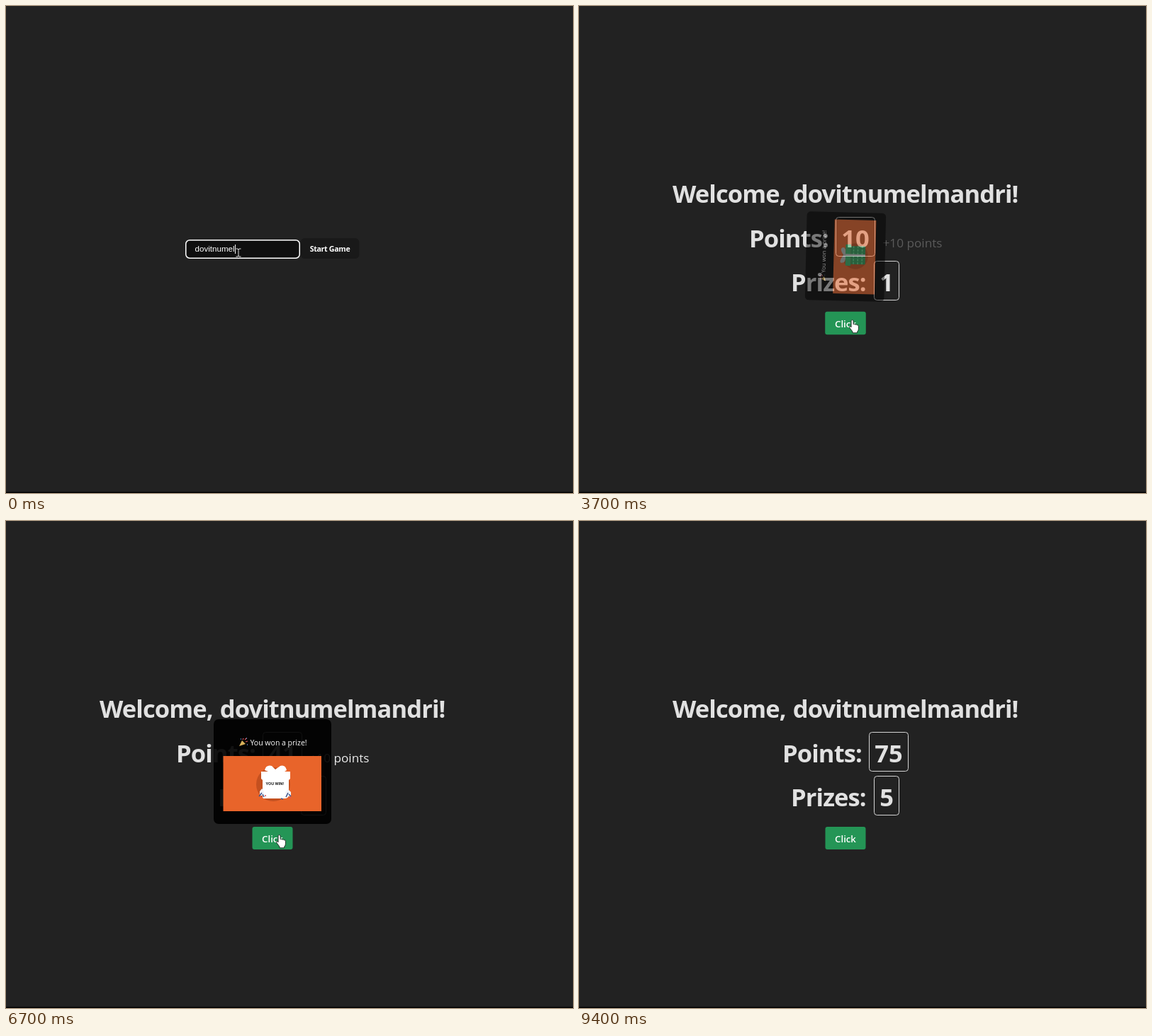
An HTML page that plays this animation: 800 px wide and 688 px high, repeating every 9.6 s.

```html
<!DOCTYPE html>
<html lang="en">
<head>
<meta charset="utf-8">
<title>Click game</title>
<style>
  html, body { margin: 0; width: 100%; height: 100%; overflow: hidden; background: #222; }
  svg { display: block; width: 800px; height: 688px; }
  text { font-family: "Open Sans", "Noto Sans", sans-serif; fill: #fff; white-space: pre; }
  .heading { font-size: 34.5px; font-weight: 700; letter-spacing: -.9px; word-spacing: 2px; fill: #e1e1e1; }
  .number { font-size: 34.5px; font-weight: 700; fill: #e1e1e1; text-anchor: middle; }
  .frame { fill: none; stroke: #d4d4d4; }
  .field { font: 11.6px "Liberation Sans", Arial, sans-serif; }
  .start { font-size: 10.6px; font-weight: 700; letter-spacing: -.3px; text-anchor: middle; }
  .click { font-size: 13.2px; font-weight: 600; text-anchor: middle; }
  .bonus { font-size: 17.2px; fill: #ebebeb; }
  .title { font-size: 10.5px; }
  .win { font: 700 5.9px Roboto, sans-serif; fill: #222; text-anchor: middle; }
</style>
</head>
<body>
<svg viewBox="0 0 800 688">
  <defs>
    <!-- card, centred on its own origin -->
    <g id="cardBase">
      <rect x="-83" y="-74" width="166" height="148" rx="7" fill="#000" fill-opacity=".92"/>
      <path d="M-47 -36l4 -8 5 5z" fill="#d8b15a"/>
      <path d="M-42 -45l1 -2M-38 -42l3 -1M-39 -45l2 -2" stroke="#d9575c" stroke-width="1.3"/>
      <path d="M-45 -46h1M-36 -38h1M-37 -47h1" stroke="#6f9be0" stroke-width="1.3"/>
      <text class="title" x="-31.5" y="-37">You won a prize!</text>
      <rect x="-69.5" y="-22" width="138.5" height="78" fill="#e8642a"/>
      <circle cx="1" cy="18" r="24" fill="#c4501f"/>
    </g>
    <g id="closedGift">
      <path d="M3 -4q-18 -12 -14 1q3 4 14 3q14 1 14 -4q-1 -9 -14 0z" fill="#b9bdb8"/>
      <rect x="-17" y="0" width="40" height="10" rx="1" fill="#39b56a"/>
      <rect x="-14" y="10" width="34" height="27" rx="1" fill="#2f9d59"/>
      <path d="M-14 15h34M-14 23h34M-14 31h34" stroke="#69d68c" stroke-width="2" stroke-dasharray="4 2"/>
      <path d="M3 0v37" stroke="#c9cdc8" stroke-width="4"/>
    </g>
    <g id="openGift">
      <path d="M4 -3l-5 -5q-8 -2 -10 6l5 2h-10v10l2 2v24q0 2 3 2h28q5 0 6 -4V12l2 -2V0h-8l3 -2q-2 -8 -9 -6z" fill="#fff"/>
      <text class="win" x="3.3" y="19">YOU WIN!</text>
      <path d="M-18 28l3 -4 3 4v6h-6zM18 29l4 -4 4 4v6h-7z" fill="#f3f4f8"/>
      <path d="M-19 35l4 -5M-12 36l-2 -4M19 36l3 -6M26 35l-3 -3M12 38l3 1" stroke="#40568c" stroke-width="1.6"/>
      <path d="M-17 36h2M-11 34h2M23 37h3" stroke="#d9575c" stroke-width="1.4"/>
    </g>
  </defs>

  <rect width="800" height="688" fill="#222"/>
  <rect y="686.5" width="800" height="1.5" fill="#000"/>

  <g id="login">
    <rect id="field" x="253.75" y="330.75" width="160.5" height="25.5" rx="5.5" fill="#0f0f0f" stroke-width="1.5"/>
    <text id="typed" class="field" x="266.5" y="347"></text>
    <rect id="caret" y="337" width="1" height="13" fill="#fff"/>
    <rect id="start" x="415.5" y="328" width="83" height="29" rx="6" fill="#191919"/>
    <text class="start" x="457" y="347">Start Game</text>
  </g>

  <g id="game">
    <text id="welcome" class="heading" x="132" y="278"></text>
    <g id="pointsRow">
      <text class="heading" x="2" y="341">Points:</text>
      <rect id="pointsBox" class="frame" x="124.5" y="298.5" height="55" rx="4"/>
      <text id="points" class="number" y="341"></text>
      <text id="bonus" class="bonus" x="190.5" y="340.5">+10 points</text>
    </g>
    <text class="heading" x="299" y="403">Prizes:</text>
    <rect class="frame" x="416.5" y="360.5" width="35" height="55" rx="4"/>
    <text id="prizes" class="number" x="434" y="403"></text>
    <g id="button">
      <rect id="buttonFace" x="-28.5" y="-16" width="57" height="32" rx="3"/>
      <text class="click" x="0" y="5.5">Click</text>
    </g>
    <g id="cards"></g>
  </g>

  <g id="cursor">
    <path id="beam" d="M-3.5 -5.5h2.5l1 1 1 -1h2.5M0 -4.5v9M-3.5 5.5h2.5l1 -1 1 1h2.5" fill="none" stroke="#ddd"/>
    <path id="arrow" d="M0 0v11.5l2.7 -2.4 2 4.4 2 -.9 -2 -4.3h3.6z" fill="#fff" stroke="#111" stroke-width=".7"/>
    <path id="hand" d="M-1.4 1q1.5 -2 3 0v5.2q1.5 -1.2 2.6 .4 1.6 -.9 2.5 .6 2 -.5 2.2 1.4v4q0 2.6 -1.8 4v1.7h-6.6v-1.7l-4.3 -5.8q-.4 -2 1.5 -1.6l.9 1z" fill="#fff" stroke="#111" stroke-width=".8"/>
  </g>
</svg>
<script>
const LOOP = 9600, STEP = 100, GAME_START = 2100, LIFE = 700;
const NAME = "dovitnumelmandri";

// Each award: time, points after it, and optionally a bonus note and a prize card's height
const awards = [
  { at: 3600, points: 10, bonus: true, cardY: 354 },
  { at: 5000, points: 20, bonus: true },
  { at: 5600, points: 30, bonus: true },
  { at: 6400, points: 31 },
  { at: 6470, points: 41, bonus: true, cardY: 354 },
  { at: 7200, points: 42 },
  { at: 7500, points: 43 },
  { at: 7870, points: 53, bonus: true, cardY: 354 },
  { at: 8430, points: 63, bonus: true, cardY: 354 },
  { at: 8490, points: 73, bonus: true, cardY: 166 },
  { at: 8700, points: 74 },
  { at: 8900, points: 75 },
];
const presses = [3500, 3900, 4200, 4500, 4900, 5200, 5500, 5900, 6300,
                 6900, 7100, 7400, 7700, 8000, 8300, 8600, 8800];
const cursorPath = [
  [1000, 328, 348.5], [1900, 458, 347], [2000, 457, 347], [2200, 451, 349.5],
  [2300, 452, 349], [2500, 452, 348], [3400, 385.5, 443.5],
];

const $ = id => document.getElementById(id);
const set = (node, attrs) => { for (const k in attrs) node.setAttribute(k, attrs[k]); };
const show = (node, on) => { node.style.display = on ? "" : "none"; };
const clamp = x => Math.max(0, Math.min(1, x));
const smooth = x => (x = clamp(x), x * x * (3 - 2 * x));

$("welcome").textContent = `Welcome, ${NAME}!`;
const cards = awards.filter(a => a.cardY).map(award => {
  const node = document.createElementNS("http://www.w3.org/2000/svg", "g");
  node.innerHTML = '<use href="#cardBase"/><use href="#closedGift"/><use href="#openGift"/>';
  $("cards").append(node);
  return { award, node };
});

function drawLogin(t) {
  const focused = t < 2000;
  $("typed").textContent = NAME.slice(0, 10 + Math.floor(t / 190));
  $("caret").setAttribute("x", 267 + $("typed").getComputedTextLength());
  show($("caret"), focused);
  $("field").setAttribute("stroke", focused ? "#fff" : "none");
  $("start").setAttribute("stroke", t >= 1700 ? "#646cff" : "none");
}

function drawCard({ award, node }, t) {
  const age = t - award.at;
  const visible = age >= 0 && age < LIFE;
  show(node, visible);
  if (!visible) return;
  const enter = smooth(age / 198), leave = clamp((LIFE - age) / 150);
  const scale = .5 + .5 * Math.min(enter, leave);
  set(node, {
    transform: `translate(376 ${award.cardY}) rotate(${-180 * (1 - enter)}) scale(${scale})`,
    opacity: enter * leave,
  });
  show(node.children[1], age < 150);
  show(node.children[2], age >= 150);
}

function drawGame(t) {
  const done = awards.filter(a => a.at <= t);
  const notes = done.filter(a => a.bonus && t - a.at < LIFE);
  const points = String(done.length ? done[done.length - 1].points : 0);
  const width = 15 + 20 * points.length;
  const left = 285 + (points.length === 1 ? 10 : 0) - (notes.length ? 47 : 0);

  set($("pointsRow"), { transform: `translate(${left} 0)` });
  set($("pointsBox"), { width });
  set($("points"), { x: 124.5 + width / 2 });
  $("points").textContent = points;
  $("prizes").textContent = done.filter(a => a.cardY).length;
  show($("bonus"), notes.length);
  set($("bonus"), { opacity: Math.max(0, ...notes.map(a => clamp(((t - a.at) / 190) ** 2))) });

  const press = presses.filter(p => p <= t).pop();
  const scale = [.76, .96, 1.01][(t - press) / STEP] || 1;
  const dark = clamp((1 - scale) / .24);
  set($("button"), { transform: `translate(376 448) scale(${scale})` });
  set($("buttonFace"), { fill: `rgb(${36 - 5 * dark},${149 - 18 * dark},${86 - 11 * dark})` });

  cards.forEach(card => drawCard(card, t));
}

function drawCursor(t) {
  let i = cursorPath.findIndex(p => p[0] > t);
  if (i < 0) i = cursorPath.length;
  const a = cursorPath[Math.max(0, i - 1)], b = cursorPath[Math.min(i, cursorPath.length - 1)];
  const k = a === b ? 0 : smooth((t - a[0]) / (b[0] - a[0]));
  const x = a[1] + (b[1] - a[1]) * k, y = a[2] + (b[2] - a[2]) * k;
  const kind = t < GAME_START ? (x < 415 ? "beam" : "hand") : (y > 432 ? "hand" : "arrow");
  for (const id of ["beam", "arrow", "hand"]) show($(id), id === kind);
  set($("cursor"), { transform: `translate(${x} ${y})` });
  show($("cursor"), t < 9400);
}

function draw(now) {
  const t = Math.floor((now % LOOP) / STEP) * STEP;
  const playing = t >= GAME_START;
  show($("login"), !playing);
  show($("game"), playing);
  (playing ? drawGame : drawLogin)(t);
  drawCursor(t);
}

const begin = performance.now();
function tick() {
  draw(performance.now() - begin);
  requestAnimationFrame(tick);
}
tick();
</script>
</body>
</html>
```
